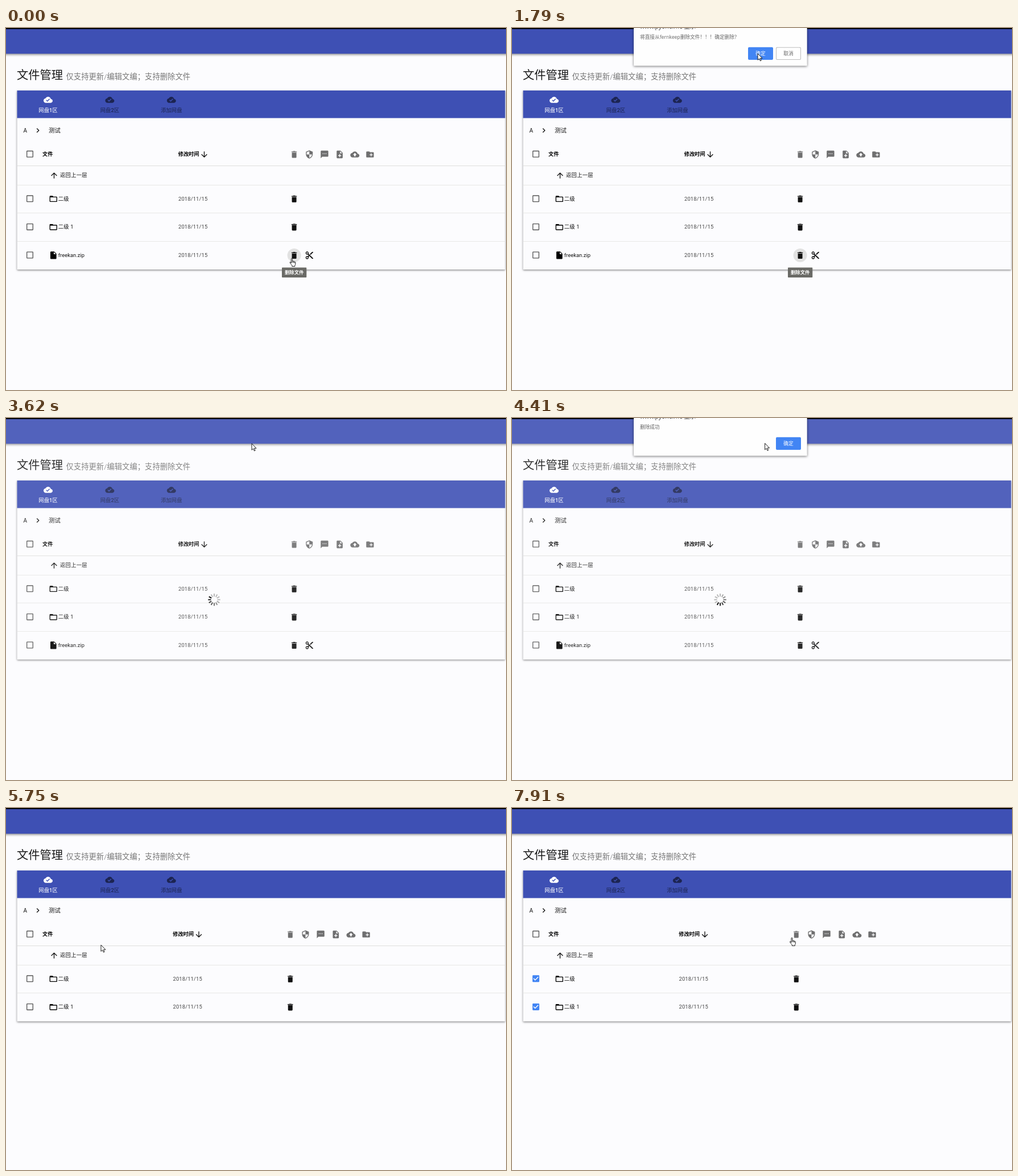
An HTML page with a canvas for the animation above (8000 ms loop, 879 by 637 pixels).

```html
<!DOCTYPE html>
<html lang="zh-CN">
<head>
<meta charset="utf-8">
<title>文件管理</title>
<style>
  html, body { margin: 0; width: 100%; height: 100%; overflow: hidden; background: #fcfcfe; }
  canvas { display: block; }
</style>
</head>
<body>
<canvas id="stage" width="879" height="637"></canvas>
<script>
const LOOP = 8000;
const W = 879, H = 637;
const PAPER = '#fcfcfe', INDIGO = '#3e50b4', BLUE = '#4285f4';
const GREY = 'rgba(0,0,0,.56)', INK = '#111';
const UI = 'Roboto, "Noto Sans CJK SC", "Noto Sans CJK", sans-serif';
const SYSTEM = '"Open Sans", "Noto Sans CJK SC", "Noto Sans CJK", sans-serif';

const stage = document.getElementById('stage').getContext('2d');
const layer = document.createElement('canvas');
layer.width = W;
layer.height = 100;
const dialogCtx = layer.getContext('2d');

// Icons on a 24 unit grid
const cloud = 'M19.35 10.04C18.67 6.59 15.64 4 12 4 9.11 4 6.6 5.64 5.35 8.04 2.34 8.36 0 10.91 0 14c0 3.31 2.69 6 6 6h13c2.76 0 5-2.24 5-5 0-2.64-2.05-4.78-4.65-4.96z';
const folder = 'M20 6h-8l-2-2H4c-1.1 0-2 .9-2 2v12c0 1.1.9 2 2 2h16c1.1 0 2-.9 2-2V8c0-1.1-.9-2-2-2z';
const icons = {
  trash: 'M6 19c0 1.1.9 2 2 2h8c1.1 0 2-.9 2-2V7H6v12zM19 4h-3.5l-1-1h-5l-1 1H5v2h14V4z',
  shield: 'M12 1L3 5v6c0 5.55 3.84 10.74 9 12 5.16-1.26 9-6.45 9-12V5l-9-4zm0 10.99h7c-.53 4.12-3.28 7.79-7 8.94V12H5V6.3l7-3.11v8.8z',
  message: 'M20 2H4c-1.1 0-2 .9-2 2v18l4-4h14c1.1 0 2-.9 2-2V4c0-1.1-.9-2-2-2zM9 11H7V9h2v2zm4 0h-2V9h2v2zm4 0h-2V9h2v2z',
  addFile: 'M14 2H6c-1.1 0-2 .9-2 2v16c0 1.1.9 2 2 2h12c1.1 0 2-.9 2-2V8l-6-6zm2 14h-3v3h-2v-3H8v-2h3v-3h2v3h3v2zm-3-7V3.5L18.5 9H13z',
  upload: cloud + 'M14 13v4h-4v-4H7l5-5 5 5h-3z',
  addFolder: folder + 'M19 14h-3v3h-2v-3h-3v-2h3V9h2v3h3v2z',
  cloudDone: cloud + 'M10 17l-3.5-3.5 1.41-1.41L10 14.17 15.18 9l1.41 1.41L10 17z',
  folder: folder + 'M20 18H4V8h16v10z',
  file: 'M6 2c-1.1 0-2 .9-2 2v16c0 1.1.9 2 2 2h12c1.1 0 2-.9 2-2V8l-6-6H6zm7 7V3.5L18.5 9H13z',
  cut: 'M9.64 7.64c.23-.5.36-1.05.36-1.64 0-2.21-1.79-4-4-4S2 3.79 2 6s1.79 4 4 4c.59 0 1.14-.13 1.64-.36L10 12l-2.36 2.36C7.14 14.13 6.59 14 6 14c-2.21 0-4 1.79-4 4s1.79 4 4 4 4-1.79 4-4c0-.59-.13-1.14-.36-1.64L12 14l7 7h3v-1L9.64 7.64zM6 8a2 2 0 1 1 0-4 2 2 0 0 1 0 4zm0 12a2 2 0 1 1 0-4 2 2 0 0 1 0 4zm6-7.5a.5.5 0 1 1 0-1 .5.5 0 0 1 0 1zM19 3l-6 6 2 2 7-7V3z',
  up: 'M4 12l1.41 1.41L11 7.83V20h2V7.83l5.58 5.59L20 12l-8-8-8 8z',
  down: 'M20 12l-1.41-1.41L13 16.17V4h-2v12.17l-5.58-5.59L4 12l8 8 8-8z',
  next: 'M10 6L8.59 7.41 13.17 12l-4.58 4.59L10 18l6-6z',
  box: 'M5 3h14q2 0 2 2v14q0 2-2 2H5q-2 0-2-2V5q0-2 2-2zM5 5v14h14V5z',
  checked: 'M5 3h14q2 0 2 2v14q0 2-2 2H5q-2 0-2-2V5q0-2 2-2zM10 17l-5-5 1.41-1.41L10 14.17l7.59-7.59L19 8l-9 9z'
};
for (const name in icons) icons[name] = new Path2D(icons[name]);

const arrowShape = new Path2D('M0 0V17l4-3.6 2.6 6 2.6-1.1L6.7 12.4H12z');
const handShape = new Path2D('M4.5 13V2a1.5 1.5 0 0 1 3 0v6q2.6-1.2 3 .6 2.1-.7 2.6 1 2-.3 2.4 1.5v4q0 2-1.5 4v2.6H6.5V19Q4 16.5 1 12q-.6-1.6.6-2t2.9 3z');
const knuckles = new Path2D('M7.5 8v4M10.5 9v3.4M13 10v3');

// Pointer tip: time, x, y
const pointerKeys = [
  [0, 502.5, 405], [300, 502.5, 405], [500, 504.5, 401], [880, 504.5, 401],
  [1500, 432, 45], [4250, 432, 45], [4750, 483.5, 43], [5200, 483.5, 43],
  [5960, 95, 286], [6350, 44.5, 305], [6780, 44.5, 305], [7050, 44, 350],
  [7260, 44, 350], [7650, 491, 229], [7850, 492, 228], [LOOP, 492, 228]
];

const within = (t, from, to) => t >= from && t < to;
const clamp = v => Math.max(0, Math.min(1, v));
const smooth = v => v * v * (3 - 2 * v);

function text(c, str, x, midY, size, color, { weight = 400, font = UI, align = 'left', spacing = 0 } = {}) {
  c.font = `${weight} ${size}px ${font}`;
  c.letterSpacing = spacing + 'px';
  c.textAlign = align;
  c.fillStyle = color;
  c.fillText(str, x, midY + size * .36);
}

function icon(name, x, y, color = INK) {
  stage.save();
  stage.translate(x - 8, y - 8);
  stage.scale(2 / 3, 2 / 3);
  stage.fillStyle = color;
  stage.fill(icons[name], 'evenodd');
  stage.restore();
}

function rect(c, x, y, w, h, color, radius = 0) {
  c.fillStyle = color;
  c.beginPath();
  c.roundRect(x, y, w, h, radius);
  c.fill();
}

function shadowed(c, alpha, blur, dy, draw) {
  c.save();
  c.shadowColor = `rgba(0,0,0,${alpha})`;
  c.shadowBlur = blur;
  c.shadowOffsetY = dy;
  draw();
  c.restore();
}

function disc(x, y, r, color) {
  stage.fillStyle = color;
  stage.beginPath();
  stage.arc(x, y, r, 0, 7);
  stage.fill();
}

function checkbox(y, isChecked, hover) {
  if (hover) disc(42, y, 11.5, '#ececee');
  if (isChecked) rect(stage, 37, y - 5, 10, 10, '#fff');
  icon(isChecked ? 'checked' : 'box', 42, y, isChecked ? BLUE : '#555');
}

function header() {
  rect(stage, 0, 0, W, H, PAPER);
  shadowed(stage, .45, 4, 1.3, () => rect(stage, -5, 0, W + 10, 45.3, INDIGO));
  rect(stage, 0, 0, W, 2, '#000');
  text(stage, '文件管理', 19, 83, 20.3, '#1a1a1a', { weight: 300 });
  text(stage, '仅支持更新/编辑文编；支持删除文件', 105.5, 85.5, 13.33, '#777', { weight: 300 });
}

function card(bottom) {
  shadowed(stage, .5, 3.5, 1.2, () => rect(stage, 19.5, 110, 858, bottom - 110, PAPER, 1));
  rect(stage, 19.5, 110, 858, 48.5, INDIGO);
  ['网盘1区', '网盘2区', '添加网盘'].forEach((label, i) => {
    const x = 74 + i * 108.4;
    const color = i ? 'rgba(0,0,0,.54)' : '#fff';
    icon('cloudDone', x, 126.3, color);
    text(stage, label, x, 144.5, 9.33, color, { weight: 500, align: 'center' });
  });
  text(stage, 'A', 30.5, 180.3, 10, INK);
  icon('next', 56, 180.3);
  text(stage, '测试', 75, 180, 10.4, INK);
}

function table(t, reloaded) {
  const dateX = reloaded ? 293.5 : 303;
  const toolX = reloaded ? 499.8 : 506.6;
  const hoverTrash = t < 2050;

  checkbox(221.8, false, false);
  text(stage, '文件', 64, 221.8, 9.2, '#000', { weight: 700 });
  text(stage, '修改时间', dateX - .3, 221.8, 9.2, '#000', { weight: 700 });
  icon('down', dateX + 45.5, 222.7);
  ['trash', 'shield', 'message', 'addFile', 'upload', 'addFolder'].forEach((name, i) =>
    icon(name, toolX + i * 26.67, 222.5, GREY));

  icon('up', 84.5, 259.5);
  text(stage, '返回上一层', 95, 259, 9.33, INK, { spacing: .25 });

  ['二级', '二级 1', 'freekan.zip'].slice(0, reloaded ? 2 : 3).forEach((name, i) => {
    const y = 300.3 + i * 49.6;
    const isFile = i === 2;
    const ticked = i === 0 ? t >= 6720 : i === 1 && t >= 7180;
    const hover = i === 0 ? within(t, 6250, 6880) : i === 1 && within(t, 6950, 7310);
    checkbox(y, ticked, hover);
    icon(isFile ? 'file' : 'folder', 83.3, y + .4, '#000');
    text(stage, name, 91.8, y, 9.33, INK, { spacing: isFile ? .05 : .17 });
    text(stage, '2018/11/15', dateX, y + .2, 9.33, '#444', { spacing: .167 });
    if (isFile && hoverTrash) disc(toolX, y + .5, 12, '#e2e2e2');
    icon('trash', toolX, y + .5);
    if (isFile) icon('cut', toolX + 26.8, y + .5);
  });

  [242, 276, 325, 375].forEach((y, i) => {
    if (i < 3 || !reloaded) rect(stage, 20, y, 857, 1, i ? '#e8e8e6' : '#dfdfdd');
  });
  if (hoverTrash) {
    rect(stage, 485, 421.5, 43.3, 17.5, '#6a6a66', 1);
    text(stage, '删除文件', 506.7, 430.3, 8.4, '#fff', { weight: 700, align: 'center' });
  }
}

function spinner(t) {
  const lead = Math.floor((t - 3620) / (1000 / 12) + .01) + 10;
  stage.save();
  stage.translate(366, 319.7);
  stage.lineWidth = 2;
  for (let i = 0; i < 12; i++) {
    const age = (((lead - i) % 12) + 12) % 12;
    const shade = Math.min(185, 15 + age * 26);
    stage.strokeStyle = `rgb(${shade},${shade},${shade})`;
    stage.beginPath();
    stage.moveTo(0, -5.5);
    stage.lineTo(0, -10.7);
    stage.stroke();
    stage.rotate(Math.PI / 6);
  }
  stage.restore();
}

function button(x, label, primary) {
  const c = dialogCtx;
  rect(c, x, 33.7, 44, 22.3, primary ? BLUE : '#bdbdbd', 2);
  if (!primary) rect(c, x + 1, 34.7, 42, 20.3, '#fff', 1.5);
  text(c, label, x + 22, 45, 8.67, primary ? '#fff' : '#666', { font: SYSTEM, align: 'center' });
}

function dialog(t, opens, closes, message, buttons) {
  const shown = Math.min(clamp((t - opens) / 100), 1 - clamp((t - closes) / 100));
  if (!shown) return;
  const c = dialogCtx;
  c.clearRect(0, 0, W, 100);
  shadowed(c, .55, 4, 1, () => rect(c, 214, -20, 304.7, 86.5, '#fefefe', 1));
  text(c, 'www.pyone.me 显示', 225, -2.7, 10.4, '#333', { font: SYSTEM });
  text(c, message, 225, 16.3, 8.67, '#666', { font: SYSTEM });
  buttons.forEach(args => button(...args));
  stage.globalAlpha = shown;
  stage.drawImage(layer, 0, -15 * (1 - shown));
  stage.globalAlpha = 1;
}

function pointer(t) {
  const next = Math.max(1, pointerKeys.findIndex(k => k[0] > t));
  const [t0, x0, y0] = pointerKeys[next - 1];
  const [t1, x1, y1] = pointerKeys[next];
  const p = smooth((t - t0) / (t1 - t0));
  const isHand = !within(t, 960, 5900) && !within(t, 7320, 7600);
  stage.save();
  stage.translate(x0 + (x1 - x0) * p, y0 + (y1 - y0) * p);
  stage.scale(2 / 3, 2 / 3);
  if (isHand) stage.translate(-6, 0);
  stage.lineWidth = 1.4;
  stage.lineJoin = 'round';
  stage.strokeStyle = '#111';
  stage.fillStyle = '#fff';
  const shape = isHand ? handShape : arrowShape;
  stage.fill(shape);
  stage.stroke(shape);
  if (isHand) stage.stroke(knuckles);
  stage.restore();
}

function draw(t) {
  const reloaded = t >= 5500;
  header();
  card(reloaded ? 375.5 : 425);
  table(t, reloaded);
  if (within(t, 2050, 4990)) rect(stage, 0, 2, W, H - 2, 'rgba(255,255,255,.1)');
  if (within(t, 2050, 5500)) spinner(t);
  if (within(t, 4990, 5500) || within(t, 5900, 6150)) rect(stage, 0, 623.3, 148, 14, '#000', [0, 2, 0, 0]);
  dialog(t, 670, 1900, '将直接从fernkeep删除文件！！！确定删除？', [[415, '确定', true], [464, '取消', false]]);
  dialog(t, 3900, 4975, '删除成功', [[464, '确定', true]]);
  pointer(t);
}

const start = performance.now();
function tick() {
  draw((performance.now() - start) % LOOP);
  requestAnimationFrame(tick);
}
tick();
</script>
</body>
</html>
```
